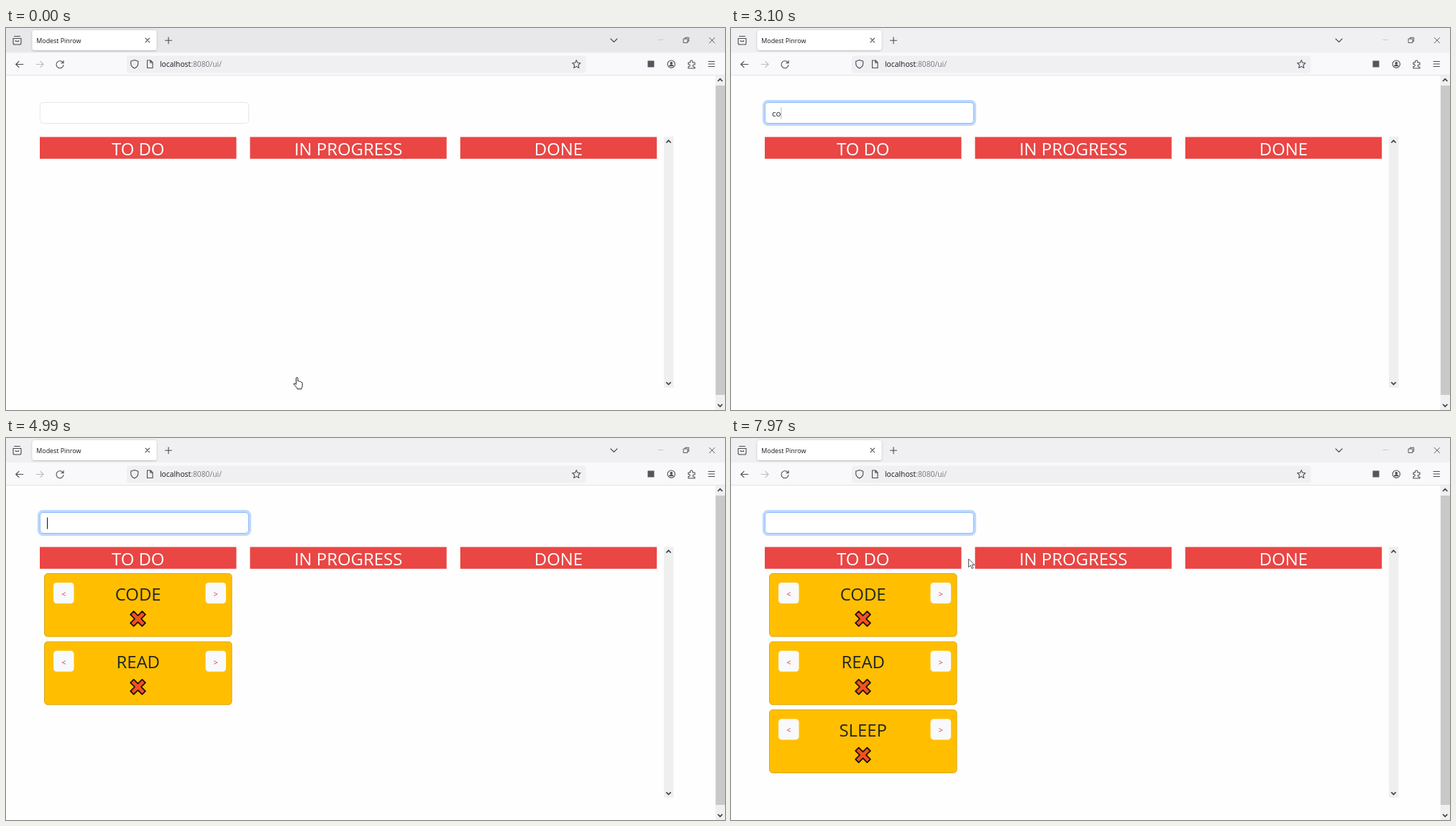
An HTML page that plays this animation: 1000 px wide and 531 px high, repeating every 8 s.

```html
<!DOCTYPE html>
<html lang="en">
<head>
<meta charset="utf-8">
<title>Task board</title>
<style>
  html, body { margin: 0; width: 100%; height: 100%; overflow: hidden; background: #fefefe; }
  svg { display: block; width: 100%; height: 100%; font-family: "Open Sans", "Noto Sans", sans-serif; }
  .line { fill: none; stroke: #4b4b52; stroke-width: 1.1; stroke-linecap: round; stroke-linejoin: round; }
  .thin { stroke-width: .9; }
  .chev { fill: none; stroke: #454545; stroke-width: 1.7; }
  .title { font-size: 23.9px; text-anchor: middle; }
  .btn { font-size: 11px; text-anchor: middle; fill: #dc3545; }
  .pointer { fill: #fff; stroke: #222; stroke-width: 1; stroke-linejoin: round; }
</style>
</head>
<body>
<svg viewBox="0 0 1000 531" preserveAspectRatio="none">
  <defs>
    <filter id="soft" x="-5%" y="-20%" width="110%" height="150%">
      <feDropShadow dx="0" dy="0.5" stdDeviation="1.3" flood-color="#000" flood-opacity=".32"/>
    </filter>
    <g id="card">
      <rect x="53.5" y="188.5" width="260.5" height="87.5" rx="4.5" fill="#ffbf00" stroke="#d9a514"/>
      <rect x="66" y="201" width="28.5" height="29" rx="4.5" fill="#f8f9fa"/>
      <rect x="277.5" y="201" width="28.5" height="29" rx="4.5" fill="#f8f9fa"/>
      <text class="btn" x="80.3" y="221">&lt;</text>
      <text class="btn" x="291.7" y="221">&gt;</text>
      <path transform="translate(183.5 251.3) rotate(45)" fill="#f4511e" stroke="#16100c" stroke-width="1.7" stroke-linejoin="round"
        d="M-3.2-11.5h6.4v8.3h8.3v6.4h-8.3v8.3h-6.4v-8.3h-8.3v-6.4h8.3z"/>
    </g>
  </defs>

  <!-- tab strip -->
  <rect id="strip" width="1000" height="34.5" fill="#e8e8ea"/>
  <rect x="36.5" y="3" width="173" height="28" rx="3.5" fill="#fff" filter="url(#soft)"/>
  <text x="42.3" y="20.5" font-size="8.9" fill="#15141a">Modest Pinrow</text>
  <g class="line">
    <path d="M11.5 11.5h8M10 14.5h11v6.5q0 2-2 2h-7q-2 0-2-2zM13.5 17.5v1h4v-1"/>
    <path d="M194 14.2l5.6 5.6m0-5.6l-5.6 5.6"/>
    <path d="M221.5 17.3h9m-4.5-4.5v9"/>
    <path d="M841 15l4.5 4.5 4.5-4.5"/>
    <path class="thin" stroke="#bbb" d="M907 16.5h7" style="stroke:#c4c4c8"/>
    <path class="thin" d="M942.5 15h5.5v5.5h-5.5zM944.5 15v-1.7h5.2v5.2h-1.7"/>
    <path class="thin" d="M978.3 13.5l7.4 7.4m0-7.4l-7.4 7.4"/>
  </g>

  <!-- toolbar -->
  <rect y="34.5" width="1000" height="31.5" fill="#f9f9fb"/>
  <rect y="65.2" width="1000" height="1" fill="#e2e2e5"/>
  <rect x="168" y="38.5" width="638.5" height="24" rx="3.5" fill="#f0f0f3"/>
  <text x="214" y="54.3" font-size="10.3" fill="#15141a">localhost<tspan fill="#77777d">:8080/ui/</tspan></text>
  <g class="line">
    <path d="M23.8 50.5h-10m4.2-4.2l-4.3 4.2 4.3 4.2"/>
    <path d="M42 50.5h10m-4.2-4.2l4.3 4.2-4.3 4.2" style="stroke:#bdbdc2"/>
    <path d="M79.3 48.2a5 5 0 1 0 .6 3.4M80 45.5v3.2h-3.2"/>
    <path d="M178.7 44.5l5 1.8v3.2q0 4.2-5 6.5-5-2.3-5-6.5v-3.2z"/>
    <path d="M196.5 45h4.5l3 3v7.5h-7.5zM200.8 45v3.2h3.2"/>
    <path id="star"/>
    <circle cx="925.3" cy="50.2" r="5.2"/>
    <path d="M949 48h2.6v-1.3a1.7 1.7 0 0 1 3.4 0V48h3v3h-1.2a1.6 1.6 0 0 0 0 3.2h1.2V56h-9v-2.5h.8a1.5 1.5 0 0 0 0-3H949z"/>
    <path d="M977 46.5h8.5M977 50h8.5M977 53.5h8.5"/>
  </g>
  <rect x="892.5" y="45.5" width="9" height="9" fill="#55555c"/>
  <circle cx="925.3" cy="48.8" r="1.9" fill="#4b4b52"/>
  <path d="M922 53.3a3.3 2.5 0 0 1 6.6 0z" fill="#4b4b52"/>

  <!-- scrollbars -->
  <rect x="986.5" y="66" width="13.5" height="465" fill="#f0f0f0"/>
  <rect x="987" y="80" width="13" height="430" fill="#c9c9c9"/>
  <rect x="915" y="151" width="13.5" height="349" fill="#efefef"/>
  <path class="chev" d="M990 74l3.2-3.2 3.2 3.2M990 523l3.2 3.2 3.2-3.2M918.3 159.5l3.2-3.2 3.2 3.2M918.3 492.3l3.2 3.2 3.2-3.2"/>

  <!-- input -->
  <rect x="47.3" y="103.5" width="290.2" height="29" rx="4.5" fill="#fff" stroke="#e3e6e9"/>
  <g id="ring" fill="none">
    <rect x="45.4" y="101.6" width="294" height="32.8" rx="6" stroke="#bed9ff" stroke-width="3.1"/>
    <rect x="47.3" y="103.5" width="290.2" height="29" rx="4.5" stroke="#8ab8f5"/>
  </g>
  <text id="entry" x="57" y="123" font-size="11.5" fill="#212529"></text>
  <rect id="caret" y="110.5" width="1" height="16" fill="#111"/>

  <g id="board"></g>

  <!-- pointers -->
  <g id="hand" class="pointer">
    <path d="M-2.5 1.5V-5.8q0-1.5 1.2-1.5t1.2 1.5v3.7q1.9-.9 2.4.6 1.7-.6 2.1.8 1.8-.3 1.8 1.4v3.6q0 1.8-1.2 3.3v1.2h-6v-1.2L-5 3.2q-1.2-1.6-.3-2.2.9-.5 2.8 1.6z"/>
  </g>
  <path id="beam" fill="none" stroke="#222" stroke-width="1.2" d="M-3.3-6.5h2.3l1 .8 1-.8h2.3M0-5.7V5.7M-3.3 6.5h2.3l1-.8 1 .8h2.3"/>
  <path id="arrow" class="pointer" style="stroke:#444;stroke-width:.9" d="M0 0v11.5l2.7-2.4 1.9 4.4 1.9-.8-1.9-4.3h3.7z"/>
</svg>
<script>
const LOOP = 8000;
const el = id => document.getElementById(id);
const board = el('board');
const pointers = ['hand', 'beam', 'arrow'];

// time, typed text, caret opacity
const typing = [
  [0, '', 0], [2370, '', .15], [2420, '', 1],
  [2820, 'c', 1], [3100, 'co', .3], [3300, 'cod', 1], [3530, 'code', 1], [3940, '', 1],
  [4230, 'r', 1], [4330, 're', 1], [4430, 'rea', 1], [4530, 'read', 1], [4990, '', 1],
  [5550, '', 0], [6030, '', 1],
  [6290, 's', 1], [6490, 'sl', 1], [6590, 'sle', 1], [6740, 'slee', 1], [6900, 'sleep', 1],
  [7130, '', 1], [7600, '', 0]
];

// time, pointer shape, x, y
const moves = [
  [0, 'hand', 406, 493], [1000, ''],
  [1050, 'hand', 385, 432], [1090, 'hand', 362, 370], [1120, 'arrow', 330, 300], [1160, 'hand', 290, 225],
  [1340, 'hand', 268, 175], [1370, 'arrow', 248, 140], [1410, 'beam', 236, 121],
  [2820, ''],
  [7890, 'beam', 256, 124], [7930, 'arrow', 300, 148], [7970, 'arrow', 330.5, 168]
];

const cards = [['CODE', 4070], ['READ', 4990], ['SLEEP', 7270]];

function add(tag, attrs, text = '') {
  const node = document.createElementNS('http://www.w3.org/2000/svg', tag);
  for (const k in attrs) node.setAttribute(k, attrs[k]);
  node.textContent = text;
  return node;
}

['TO DO', 'IN PROGRESS', 'DONE'].forEach((name, i) => {
  const x = 47 + i * 292.4;
  board.append(
    add('rect', { x, y: 151.5, width: 273.4, height: 30.3, fill: '#e94644' }),
    add('text', { class: 'title', x: x + 136.7, y: 176.5, fill: '#fff' }, name));
});

const cardNodes = cards.map(([name], i) => {
  const g = add('g', { transform: `translate(0 ${i * 94.7})` });
  g.append(add('use', { href: '#card' }),
    add('text', { class: 'title', x: 183.7, y: 225.6, fill: '#212529' }, name));
  board.append(g);
  return g;
});

const starPoints = Array.from({ length: 10 }, (_, i) => {
  const r = i % 2 ? 2.8 : 6, a = i * Math.PI / 5;
  return (793.3 + r * Math.sin(a)).toFixed(1) + ' ' + (50.6 - r * Math.cos(a)).toFixed(1);
});
el('star').setAttribute('d', 'M' + starPoints.join('L') + 'z');

const at = (table, t) => table.findLast(row => row[0] <= t);
const show = (node, on) => node.setAttribute('visibility', on ? 'visible' : 'hidden');

function draw(t) {
  const [, text, blink] = at(typing, t);
  const entry = el('entry');
  entry.textContent = text;
  el('caret').setAttribute('x', 57 + (text ? entry.getComputedTextLength() : 0));
  el('caret').setAttribute('opacity', blink);

  const k = Math.min(1, Math.max(0, (t - 2370) / 160));
  el('ring').setAttribute('opacity', k * k * (3 - 2 * k));
  el('strip').setAttribute('fill', t < 1050 ? '#e8e8ea' : '#f0f0f2');

  cards.forEach(([, start], i) => show(cardNodes[i], t >= start));

  const [, shape, x, y] = at(moves, t);
  for (const id of pointers) {
    show(el(id), id === shape);
    if (id === shape) el(id).setAttribute('transform', `translate(${x} ${y})`);
  }
}

function tick() {
  draw(performance.now() % LOOP);
  requestAnimationFrame(tick);
}
tick();
</script>
</body>
</html>
```
